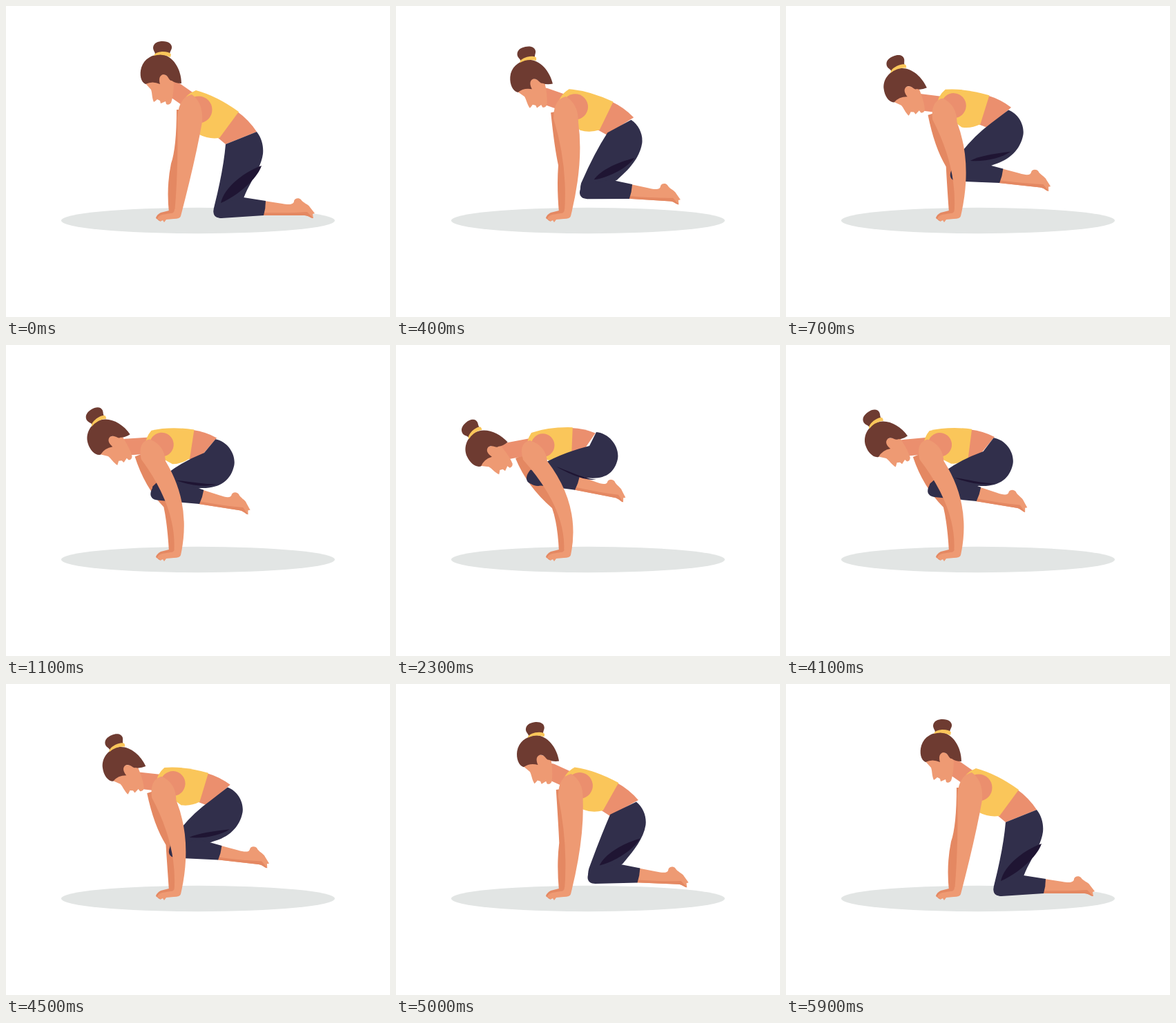
Write an HTML page that moves like this. It is 556 px wide and 450 px high and loops after 6 s.

```html
<!DOCTYPE html>
<html lang="en">
<head>
<meta charset="utf-8">
<title>Crow pose</title>
<style>
  html, body { margin: 0; width: 100%; height: 100%; overflow: hidden; background: #fff; }
  svg { display: block; width: 556px; height: 450px; }
  .skin { fill: #ee9a73; }
  .warm { fill: #eb8f6e; }
  .deep { fill: #e48862; }
  .hair { fill: #6e3b31; }
  .top { fill: #fac65a; }
  .pants { fill: #312f4b; }
  .shade { fill: #1f1533; }
  #neck { stroke: #eb8f6e; stroke-width: 24; stroke-linecap: round; }
</style>
</head>
<body>
<!-- Shapes are drawn kneeling; data-to holds the balanced shape of the soft ones. -->
<svg viewBox="0 0 556 450">
  <ellipse cx="278" cy="310.5" rx="198" ry="18.7" fill="#e2e5e4"/>
  <path class="deep" d="M236 299Q232 262 239 228Q247 205 247 150L264 150L262 210L248 299Z"
    data-to="M236 299Q234 258 226 236Q190 205 173 164L205 150L245 235L248 299Z"/>
  <path id="neck" d="M242 120L268 138" data-to="M158 154L195 147"/>
  <g id="head">
    <path class="skin" d="M200 110L210 121C212 127 211 132 214 139Q217 137 219 135L223 137L224 141L231 138L232 142Q236 144 239 140C241 134 243 126 243 106L227 98Z"/>
    <path class="hair" d="M216 70C216 66 213 65 213 60C214 53 220 51 227 51C235 51 241 55 240 61C239 65 237 66 237 71Z"/>
    <path class="hair" d="M202 113C195 110 193 99 196 89C200 76 212 70 224 70C242 71 254 92 254 112Q245 112 240 108C235 108 236 100 228 99C222 100 221 106 223 113Q212 108 202 113Z"/>
    <path class="top" d="M214 72Q215 67 226 66Q237 66 239 70L238 74Q226 68 214 72Z"/>
  </g>
  <g id="torso">
    <path class="warm" d="M334 152Q352 165 363 182L318 200L306 190Z"/>
    <path class="top" d="M253 146Q257 129 275 122Q305 130 337 153L309 191Q293 193 280 186Z"/>
    <circle class="warm" cx="279" cy="150" r="19.5"/>
  </g>
  <path class="pants" d="M318 200L363 182C371 192 373 204 372 214C369 236 352 256 344 278L312 306Q296 308 302 288Q315 236 318 200"
    data-to="M280 146L290 126C310 128 324 148 321 165C316 187 300 197 268 191L206 204Q190 204 192 186Q225 160 280 146"/>
  <g id="shank">
    <path class="skin" d="M374 282L400 286C411 288 417 287 417 282C418 278 424 277 427 280C430 285 438 287 440 291L447 300L444 301L445 307C441 307 438 303 432 303L372 303Z"/>
    <path class="deep" d="M373 299Q410 300 436 298L445 307C441 307 438 303 432 303L372 303Z"/>
    <path class="pants" d="M304 287L344 277L376 282Q376 293 373 303L312 307C300 307 298 298 304 287Z"/>
  </g>
  <path class="shade" d="M311 285C316 262 345 240 370 231C364 250 335 275 311 285"
    data-to="M232 176C250 182 270 193 290 195C272 196 252 187 232 176"/>
  <path class="skin" d="M244 301Q250 231 248 162Q250 132 269 128Q286 140 284 168Q274 224 253 304Z"
    data-to="M243 301Q248 238 184 166Q177 142 194 138Q217 146 219 168Q268 232 253 304Z"/>
  <path class="deep" d="M236 296L246 296L244 304L222 311L217 307Q218 302 224 299Z"/>
  <path class="skin" d="M244 294L253 294L253 304Q252 308 243 308L232 309L229 313L227 310L223 312L222 309L219 309Q219 304 226 302L238 300Q244 300 244 294Z"/>
</svg>
<script>
const LOOP = 6000, STEP = 100;
const RISE = 2100, LOWER_AT = 3600, LOWER = 2000;
const mix = (a, b, p) => a + (b - a) * p;

// 0 is kneeling, 1 is balanced on the hands.
function progress(t) {
  if (t < RISE) return 1 - (1 - (t / RISE) ** 1.3) ** 3;
  const u = Math.min(1, Math.max(0, (t - LOWER_AT) / LOWER));
  return (1 + Math.cos(Math.PI * u)) / 2;
}

const soft = [...document.querySelectorAll('[data-to]')].map(path => {
  const from = path.getAttribute('d');
  return { path, from, to: path.dataset.to.match(/\d+/g).map(Number) };
});

// Rigid parts travel from one joint position to another, arching by lift.
const rigid = [
  { id: 'head', from: [227, 107], to: [138, 154.5], turn: -41, scale: 1, lift: 38 },
  { id: 'torso', from: [275, 122], to: [196, 127], turn: -34, scale: .87, lift: 16 },
  { id: 'shank', from: [374, 293], to: [262, 200], turn: 11, scale: 1, lift: -22 }
];
for (const part of rigid) part.node = document.getElementById(part.id);

function draw(t) {
  const p = progress(t);
  for (const { path, from, to } of soft) {
    let k = 0;
    path.setAttribute('d', from.replace(/\d+/g, n => mix(+n, to[k++], p).toFixed(2)));
  }
  for (const { node, from, to, turn, scale, lift } of rigid) {
    const x = mix(from[0], to[0], p);
    const y = mix(from[1], to[1], p) - lift * p * (1 - p);
    node.setAttribute('transform', `translate(${x} ${y}) rotate(${turn * p}) `
      + `scale(${mix(1, scale, p)}) translate(${-from[0]} ${-from[1]})`);
  }
}

const start = performance.now();
function tick() {
  const t = (performance.now() - start) % LOOP;
  draw(Math.floor(t / STEP) * STEP);
  requestAnimationFrame(tick);
}
tick();
</script>
</body>
</html>
```
